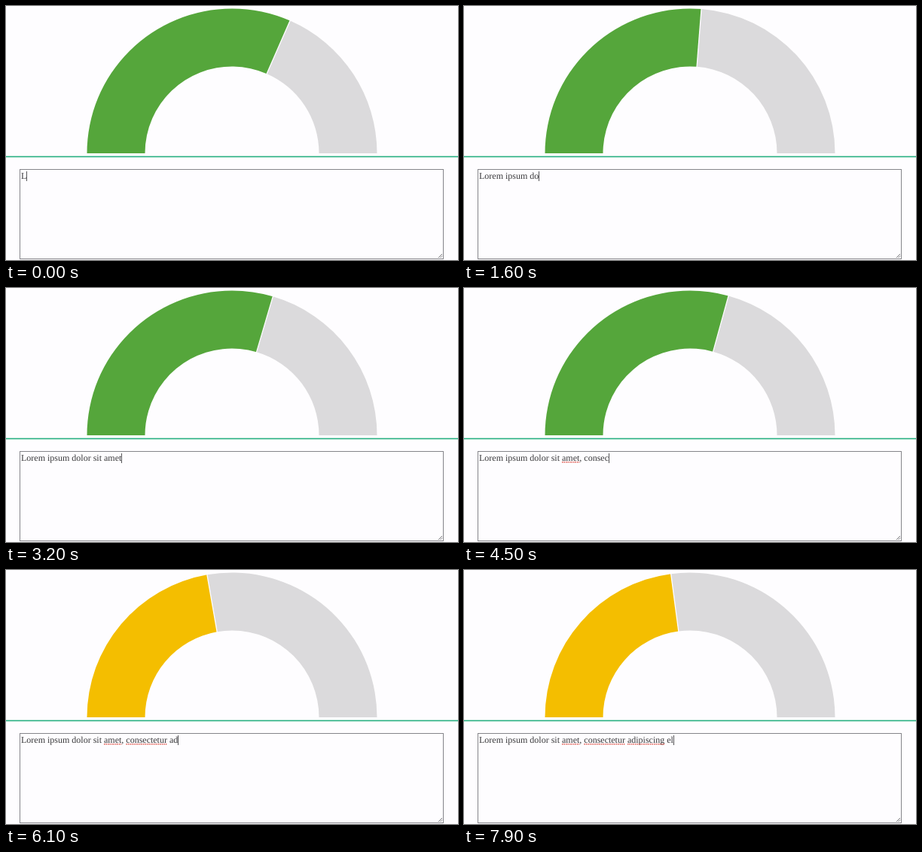
An HTML page with a canvas that plays this animation: 600 px wide and 338 px high, repeating every 8000 ms.

```html
<!DOCTYPE html>
<html lang="en">
<head>
<meta charset="utf-8">
<title>Typing gauge</title>
<style>
  html, body { margin: 0; width: 100%; height: 100%; overflow: hidden; background: #fefdff; }
  canvas { display: block; }
</style>
</head>
<body>
<canvas id="stage" width="600" height="338"></canvas>
<script>
const ctx = document.getElementById('stage').getContext('2d');
const LOOP = 8000;
const BG = '#fefdff';
const TEXT = 'Lorem ipsum dolor sit amet, consectetur adipiscing el';
const MISSPELT = ['amet', 'consectetur', 'adipiscing'];
const GAUGE = { x: 300, y: 196, outer: 192.5, inner: 115.5 };
const TEXT_X = 20, BASELINE = 230;

// [time in ms, characters typed]
const typing = [[0, 1], [100, 2], [1600, 14], [1700, 14], [3200, 26], [4500, 34],
  [5900, 40], [6100, 42], [7900, 53], [8000, 53]];
// [time in ms, gauge value from then on]
const readings = [[0, 0.631], [700, 0.525], [2100, 0.627], [2700, 0.634], [3000, 0.591],
  [3900, 0.5855], [4700, 0.582], [6000, 0.445], [7200, 0.458]];

function typedCount(t) {
  const i = typing.findIndex(([time]) => time > t);
  const [t0, n0] = typing[i - 1], [t1, n1] = typing[i];
  return Math.floor(n0 + (n1 - n0) * (t - t0) / (t1 - t0) + 0.001);
}

function reading(t) {
  return readings.filter(([time]) => time <= t).pop()[1];
}

function segment(from, to, color) {
  const { x, y, outer, inner } = GAUGE;
  const a = Math.PI * (1 + from), b = Math.PI * (1 + to);
  ctx.beginPath();
  ctx.arc(x, y, outer, a, b);
  ctx.arc(x, y, inner, b, a, true);
  ctx.closePath();
  ctx.fillStyle = color;
  ctx.fill();
}

function drawGauge(value) {
  const { x, y, outer, inner } = GAUGE;
  const angle = Math.PI * (1 + value);
  const c = Math.cos(angle), s = Math.sin(angle);
  segment(value, 1, '#dbdadc');
  segment(0, value, value < 0.5 ? '#f4be00' : '#55a63b');
  ctx.beginPath();
  ctx.moveTo(x + c * (inner - 1), y + s * (inner - 1));
  ctx.lineTo(x + c * (outer + 1), y + s * (outer + 1));
  ctx.strokeStyle = BG;
  ctx.lineWidth = 1.3;
  ctx.stroke();
}

function drawBox() {
  ctx.fillStyle = '#25ae80';
  ctx.fillRect(0, 199.7, 600, 1.6);
  ctx.lineWidth = 1;
  ctx.strokeStyle = '#85858a';
  ctx.strokeRect(18.5, 217.5, 562, 119);
  ctx.strokeStyle = '#77777a';
  ctx.beginPath();
  for (const d of [5, 2.5]) {
    ctx.moveTo(579 - d, 335);
    ctx.lineTo(579, 335 - d);
  }
  ctx.stroke();
}

function drawText(count) {
  const typed = TEXT.slice(0, count);
  ctx.font = '12px "Liberation Serif", "Times New Roman", serif';
  ctx.textRendering = 'geometricPrecision';
  const width = str => ctx.measureText(str).width;
  ctx.fillStyle = '#38383a';
  ctx.fillText(typed, TEXT_X, BASELINE);

  ctx.strokeStyle = '#e0564c';
  ctx.lineWidth = 1.4;
  ctx.setLineDash([1.5, 1]);
  for (const word of MISSPELT) {
    const start = TEXT.indexOf(word), end = start + word.length;
    if (count <= end) continue;
    ctx.beginPath();
    ctx.moveTo(TEXT_X + width(TEXT.slice(0, start)), 231.8);
    ctx.lineTo(TEXT_X + width(TEXT.slice(0, end)), 231.8);
    ctx.stroke();
  }
  ctx.setLineDash([]);

  ctx.fillStyle = '#555558';
  ctx.fillRect(Math.round(TEXT_X + width(typed)), 220, 1, 13);
}

function render(now) {
  const t = now % LOOP;
  ctx.fillStyle = BG;
  ctx.fillRect(0, 0, 600, 338);
  drawGauge(reading(t));
  drawBox();
  drawText(typedCount(t));
}

const begin = performance.now();
function tick() {
  render(performance.now() - begin);
  requestAnimationFrame(tick);
}
tick();
</script>
</body>
</html>
```
